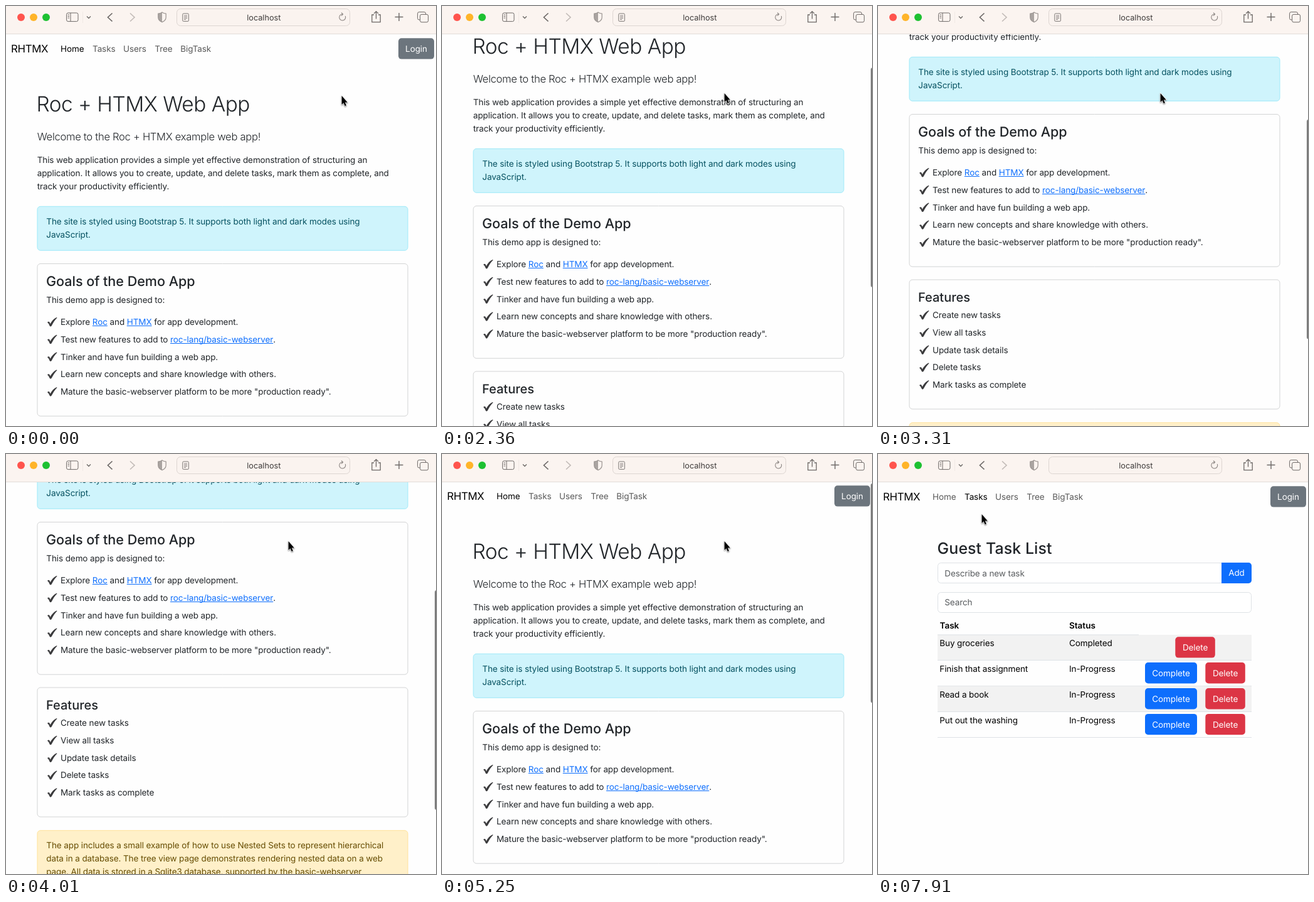
An HTML page with a canvas that plays this animation: 686x669 px, repeating every 8 s.

```html
<!DOCTYPE html>
<html lang="en">
<head>
<meta charset="utf-8">
<title>Roc + HTMX Web App</title>
<style>
html, body { margin: 0; width: 100%; height: 100%; overflow: hidden; background: #fefefe; }
canvas { display: block; width: 686px; height: 669px; }
</style>
</head>
<body>
<canvas id="stage" width="686" height="669"></canvas>
<script>
const LOOP = 8000, W = 686, H = 669, BAR = 44;
const ctx = document.getElementById('stage').getContext('2d');

// Text styles: weight, size, letter spacing.
const BODY = [430, 13.5, -0.1];
const BOLD = [600, 13.5, 0];
const TITLE = [350, 33.4, -0.5];
const LEAD = [360, 16.6, -0.3];
const BRAND = [430, 16.8, -0.3];
const H2 = [540, 24.9, 0.1];
const H3 = [540, 21.6, -0.05];
const H4 = [540, 20, 0];
const ADDRESS = [400, 12.7, 0];

const INK = '#212529', BLUE = '#0d6efd', RED = '#dc3545', GREY = '#6c757d';

// Bursts of movement: start, end, number of steps.
const BURSTS = [
  [500, 940, 6], [1560, 2360, 10], [2440, 3230, 10], [3310, 3830, 7],
  [4010, 4800, 10], [4890, 4980, 2], [5160, 5250, 2], [5430, 5610, 3],
  [5780, 6390, 8], [7110, 7110, 1], [7650, 7910, 4]
];
const SCROLL = [
  [1470, 0], [1650, 8], [1900, 36], [2360, 92], [3310, 238], [3650, 288],
  [3830, 305], [3920, 305], [4010, 302], [4190, 258], [4530, 97], [4710, 41.5],
  [4800, 20], [4890, 9], [4980, 4], [5160, 2], [5250, 1], [5430, 0]
];
const MOVES = [
  [412, 940, 535, 142, 450, 138],
  [5690, 6390, 450, 138, 166, 62],
  [7560, 7910, 166, 62, 165, 95]
];

const CHECK = new Path2D('M0 8C1.5 6 3.6 6.2 4.6 10.2C7 5.6 10.5 2 14.6 0L15.6.5C11.8 4.2 9.2 8.6 6.7 13.4C5.8 14.8 4.2 14.8 3.6 13.4C2.8 11 1.6 9.2 0 8Z');
const ARROW = new Path2D('M.6 1V15L3.6 12.2L5.8 17.2L7.9 16.3L5.7 11.4H9.8Z');
const HAND = new Path2D('M-1.9 10V2.2C-1.9.3 1 .3 1 2.2V6.6C1.2 5.2 3.6 5.2 3.8 7C4.2 5.8 6.4 6 6.5 7.8C7 6.8 9 7.2 9 9V12C9 14 7.8 15 7.6 17H-.6C-1 15-3.4 13-5.2 10.2C-6 8.6-4.2 7.4-1.9 10Z');

const clamp = v => Math.max(0, Math.min(1, v));
const mix = (a, b, k) => a + (b - a) * k;
const ease = k => k * k * (3 - 2 * k);

function heldTime(t) {
  let held = 0;
  for (const [a, b, n] of BURSTS) {
    if (t < a) break;
    const step = n > 1 ? (b - a) / (n - 1) : 1;
    held = Math.min(b, a + Math.floor((t - a) / step + 0.08) * step);
  }
  return held;
}

function track(keys, t) {
  if (t <= keys[0][0]) return keys[0][1];
  for (let i = 1; i < keys.length; i++) {
    const [t0, v0] = keys[i - 1], [t1, v1] = keys[i];
    if (t <= t1) return mix(v0, v1, (t - t0) / (t1 - t0));
  }
  return keys[keys.length - 1][1];
}

function pointer(t) {
  let x = 535, y = 142;
  for (const [a, b, x0, y0, x1, y1] of MOVES) {
    if (t < a) break;
    const k = ease(clamp((t - a) / (b - a)));
    x = mix(x0, x1, k);
    y = mix(y0, y1, k);
  }
  return [x, y];
}

function text(str, x, y, style, color = INK, align = 'left') {
  const [weight, size, gap] = style;
  ctx.font = `${weight} ${size}px Inter, sans-serif`;
  ctx.letterSpacing = gap + 'px';
  ctx.textAlign = align;
  ctx.fillStyle = color;
  ctx.fillText(str, x, y);
  return ctx.measureText(str).width;
}

function box(x, y, w, h, fill, border, r = 5) {
  ctx.beginPath();
  ctx.roundRect(x, y, w, h, r);
  if (fill) { ctx.fillStyle = fill; ctx.fill(); }
  if (border) { ctx.strokeStyle = border; ctx.lineWidth = 1; ctx.stroke(); }
}

function rect(x, y, w, h, fill) {
  ctx.fillStyle = fill;
  ctx.fillRect(x, y, w, h);
}

function lines(d, color, width = 1.2) {
  ctx.strokeStyle = color;
  ctx.lineWidth = width;
  ctx.stroke(new Path2D(d));
}

function at(x, y, draw) {
  ctx.save();
  ctx.translate(x, y);
  draw();
  ctx.restore();
}

function button(label, x, y, w, color) {
  box(x, y, w, 33.4, color);
  text(label, x + w / 2, y + 21.6, BODY, '#fff', 'center');
}

// A list row; pieces wrapped in [ ] are links.
function checkItem(str, y) {
  at(66, y - 12, () => { ctx.fillStyle = '#3b3b3d'; ctx.fill(CHECK); });
  let x = 87;
  str.split(/[\[\]]/).forEach((part, i) => {
    const link = i % 2 === 1;
    const w = text(part, x, y, BODY, link ? BLUE : INK);
    if (link) rect(x, Math.round(y + 1), w, 1, BLUE);
    x += w;
  });
}

function checkList(items, y) {
  items.forEach((item, i) => checkItem(item, y + i * 27.8));
}

function paragraph(rows, x, y, color) {
  rows.forEach((row, i) => text(row, x, y + i * 21, BODY, color));
}

function navbar(active, hover) {
  text('RHTMX', 8, 73.6, BRAND, '#000');
  const links = { Home: 87, Tasks: 138, Users: 187, Tree: 237.3, BigTask: 278.3 };
  for (const name in links) {
    const color = name === active ? '#000' : name === hover ? '#333' : '#595959';
    text(name, links[name], 72.8, BODY, color);
  }
  button('Login', 626, 51.2, 57, GREY);
}

function homePage(hover) {
  navbar('Home', hover);
  text('Roc + HTMX Web App', 48.5, 168, TITLE);
  text('Welcome to the Roc + HTMX example web app!', 49.7, 214.4, LEAD);
  paragraph([
    'This web application provides a simple yet effective demonstration of structuring an',
    'application. It allows you to create, update, and delete tasks, mark them as complete, and',
    'track your productivity efficiently.'
  ], 49.7, 250, INK);

  box(50, 319.3, 591, 70, '#cff4fc', '#9eeaf9');
  paragraph([
    'The site is styled using Bootstrap 5. It supports both light and dark modes using',
    'JavaScript.'
  ], 64.3, 348, '#055160');

  box(50, 410.5, 591, 242.7, null, '#d3d4d5');
  text('Goals of the Demo App', 64, 446.2, H3);
  text('This demo app is designed to:', 64.3, 473.2, BODY);
  checkList([
    'Explore [Roc] and [HTMX] for app development.',
    'Test new features to add to [roc-lang/basic-webserver].',
    'Tinker and have fun building a web app.',
    'Learn new concepts and share knowledge with others.',
    'Mature the basic-webserver platform to be more "production ready".'
  ], 508);

  box(50, 674, 591, 206, null, '#d3d4d5');
  text('Features', 64, 709.2, H4);
  checkList([
    'Create new tasks', 'View all tasks', 'Update task details',
    'Delete tasks', 'Mark tasks as complete'
  ], 735);

  box(50, 901.7, 591, 112, '#fff0c9', '#ffe29a');
  paragraph([
    'The app includes a small example of how to use Nested Sets to represent hierarchical',
    'data in a database. The tree view page demonstrates rendering nested data on a web',
    'page. All data is stored in a Sqlite3 database, supported by the basic-webserver'
  ], 64.3, 930.4, '#664d03');
}

function tasksPage() {
  navbar('Tasks');
  text('Guest Task List', 94.6, 159.2, H2);
  box(95.5, 173.5, 500, 32, '#fff', '#dee2e6');
  text('Describe a new task', 106.3, 194.6, BODY, '#595c5f');
  box(548, 173, 48, 33, BLUE, null, [0, 5, 5, 0]);
  text('Add', 572, 194.4, BODY, '#fff', 'center');
  box(95.5, 220.5, 500, 32, '#fff', '#dee2e6');
  text('Search', 106.3, 241.4, BODY, '#595c5f');

  text('Task', 98.5, 278, BOLD, '#000');
  text('Status', 305, 278, BOLD, '#000');
  const tasks = ['Buy groceries', 'Finish that assignment', 'Read a book', 'Put out the washing'];
  tasks.forEach((task, i) => {
    const y = 288 + i * 40.9, done = i === 0;
    if (i % 2 === 0) rect(95, y, 501, 40.5, '#f2f2f2');
    rect(95, Math.round(y + 40), 501, 1, '#dee2e6');
    text(task, 98.3, y + 18.2, BODY, '#000');
    text(done ? 'Completed' : 'In-Progress', 305, y + 18.2, BODY, '#000');
    if (!done) button('Complete', 426, y + 3.2, 83, BLUE);
    button('Delete', done ? 474.3 : 522.3, y + 3.2, 63.5, RED);
  });
  rect(95, 287.5, 321, 1, '#dee2e6');
}

function toolbar(reader) {
  const dark = '#6d6967', pale = '#c3bcb8';
  rect(0, 0, W, BAR, '#fbf4f0');
  rect(0, BAR, W, 1, '#e3dcd8');
  ['#ff544d', '#ffb429', '#1dc132'].forEach((color, i) => box(18 + i * 20, 12, 12, 12, color, null, 6));

  box(96.6, 11, 18.4, 13.6, null, dark, 2.5);
  lines('M103 11V24.5M98.6 14H101M98.6 16.5H101M98.6 19H101', dark, 1);
  lines('M122.5 9V27', '#efe8e4', 1);
  lines('M129 16.6L132 19.6L135 16.6', dark, 1.4);
  lines('M169.5 11.5L162.5 18L169.5 24.5', dark, 1.7);
  lines('M198 11.5L205 18L198 24.5', pale, 1.7);

  const shield = 'M249 10C247 11.6 245 12 242.8 12.2V18C242.8 21.8 245.5 24.2 249 25.6';
  ctx.fillStyle = '#aaa4a1';
  ctx.fill(new Path2D(shield + 'Z'));
  lines(shield + 'C252.5 24.2 255.2 21.8 255.2 18V12.2C253 12 251 11.6 249 10Z', '#9b9592', 1.2);

  box(272.5, 4.5, 276, 27, '#faf3ef', '#ddd5d1', 6);
  if (reader) {
    box(281.8, 12, 9.6, 12.4, null, '#7d7876', 1.5);
    lines('M284 15.2H289.2M284 17.4H289.2M284 19.6H289.2M284 21.6H287', '#7d7876', 0.9);
  }
  text('localhost', 411.3, 22.6, ADDRESS, '#3f3c3b', 'center');
  lines('M541.3 16A5 5 0 1 1 537 13M535 10.6L537.6 13.1L535 15.6', '#8a8481', 1.1);

  lines('M587 14H583.8V25.6H597.2V14H594M590.5 20.5V8.6M587 12L590.5 8.6L594 12', dark, 1.3);
  lines('M620.5 17.5H633.5M627 11V24', dark, 1.4);
  box(656.6, 9.6, 13, 12.4, null, dark, 2.5);
  box(660.6, 13.4, 13, 12.4, '#fbf4f0', dark, 2.5);
}

function cursor(x, y, hand) {
  at(x, y, () => {
    ctx.lineJoin = 'round';
    ctx.save();
    ctx.shadowColor = 'rgba(0,0,0,.35)';
    ctx.shadowBlur = 2;
    ctx.shadowOffsetY = 1;
    ctx.fillStyle = ctx.strokeStyle = '#fff';
    ctx.lineWidth = 1.8;
    if (!hand) ctx.stroke(ARROW);
    ctx.fill(hand ? HAND : ARROW);
    ctx.restore();
    if (hand) {
      ctx.strokeStyle = '#000';
      ctx.lineWidth = 1.2;
      ctx.stroke(HAND);
      lines('M1.2 6.6V9.6M3.9 7V9.8M6.6 8V10.2', '#000', 1);
    } else {
      ctx.fillStyle = '#000';
      ctx.fill(ARROW);
    }
  });
}

function render(time) {
  const t = heldTime(time);
  const scroll = Math.round(track(SCROLL, t));
  const [x, y] = pointer(t);
  const hand = t > 5700 && y < 84 && x < 178;

  rect(0, 0, W, H, '#fefefe');
  at(0, -scroll, () => t < 7110 ? homePage(hand ? 'Tasks' : '') : tasksPage());

  if (t >= 1560 && t < 5600) {
    ctx.globalAlpha = t > 5500 ? 0.4 : 1;
    box(684, 46 + scroll * 0.566, 6, 350, '#7b7b7b', null, 3);
    ctx.globalAlpha = 1;
  }
  toolbar(t < 7650);
  cursor(x, y, hand);
}

function frame() {
  render(performance.now() % LOOP);
  requestAnimationFrame(frame);
}
ctx.textRendering = 'geometricPrecision';
frame();
</script>
</body>
</html>
```
